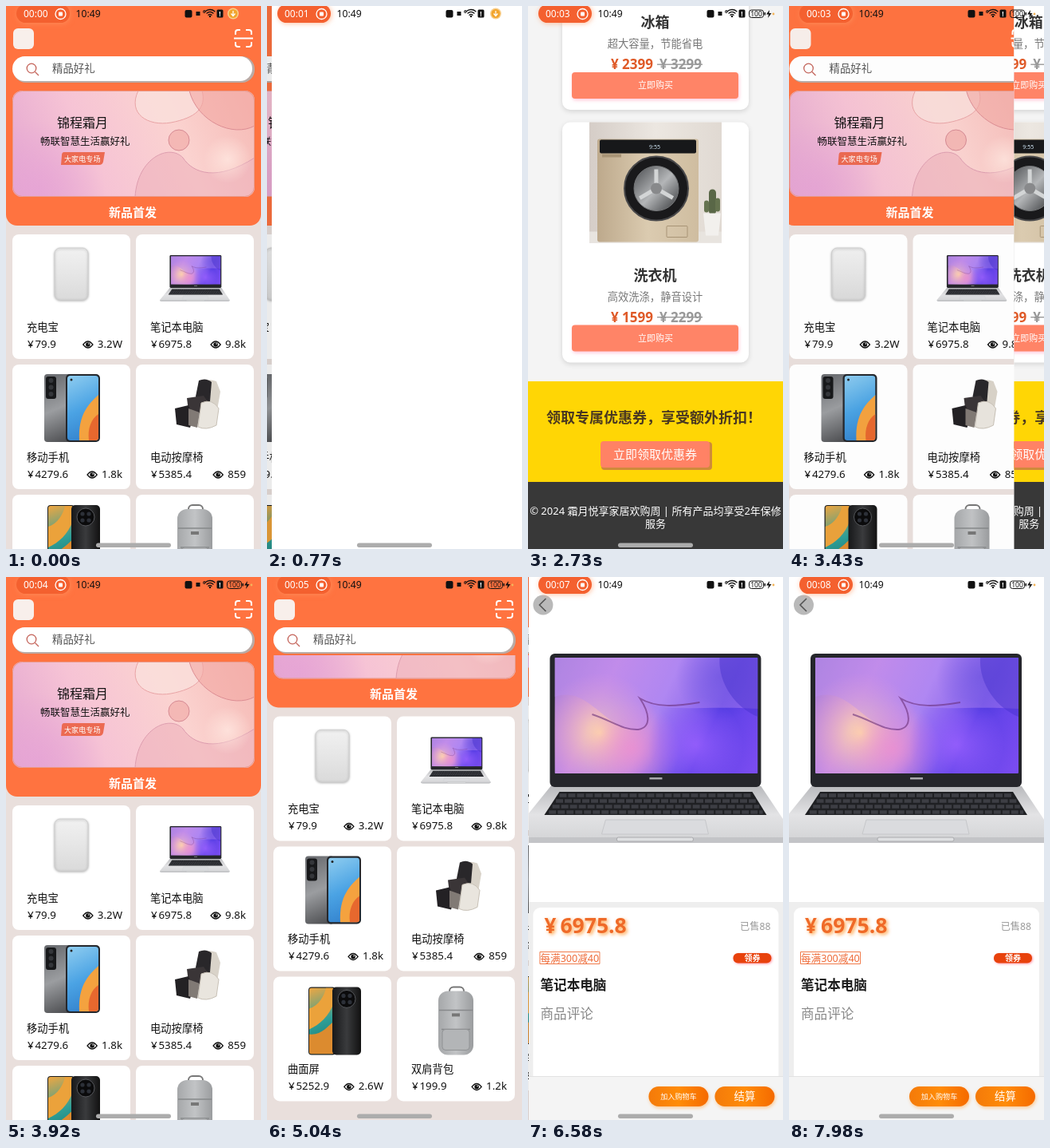
An HTML page with a canvas that plays this animation: 320 px wide and 680 px high, repeating every 8 s.

```html
<!DOCTYPE html>
<html lang="zh-CN">
<head>
<meta charset="utf-8">
<style>
html, body { margin: 0; width: 320px; height: 680px; overflow: hidden; background: #fff; }
canvas { display: block; }
</style>
</head>
<body>
<canvas id="stage" width="320" height="680"></canvas>
<script>
const g = document.getElementById('stage').getContext('2d');
const FONT = '"Noto Sans","Noto Sans CJK SC","Noto Sans CJK",sans-serif';
const clamp = v => Math.max(0, Math.min(1, v));

// ---------- drawing helpers ----------
function box(x, y, w, h, r, fill, stroke, lw = 1) {
  g.beginPath();
  g.roundRect(x, y, w, h, r);
  paint(fill, stroke, lw);
}
function paint(fill, stroke, lw = 1) {
  if (fill) { g.fillStyle = fill; g.fill(); }
  if (stroke) { g.strokeStyle = stroke; g.lineWidth = lw; g.stroke(); }
}
function disc(x, y, r, fill, stroke, lw) {
  g.beginPath();
  g.arc(x, y, r, 0, 7);
  paint(fill, stroke, lw);
}
function shape(d, fill, stroke, lw) {
  const p = new Path2D(d);
  if (fill) { g.fillStyle = fill; g.fill(p); }
  if (stroke) { g.strokeStyle = stroke; g.lineWidth = lw || 1; g.stroke(p); }
}
function text(s, x, y, size, color, weight = 400, align = 'left') {
  g.font = `${weight} ${size}px ${FONT}`;
  g.textAlign = align;
  g.fillStyle = color;
  g.fillText(s, x, y);
}
function fade(x0, y0, x1, y1, ...colors) {
  const f = g.createLinearGradient(x0, y0, x1, y1);
  colors.forEach((c, i) => f.addColorStop(i / (colors.length - 1), c));
  return f;
}
function glow(x, y, r, inner, outer) {
  const f = g.createRadialGradient(x, y, 0, x, y, r);
  f.addColorStop(0, inner);
  f.addColorStop(1, outer);
  disc(x, y, r, f);
}
function group(fn) { g.save(); fn(); g.restore(); }
function at(x, y, fn) { group(() => { g.translate(x, y); fn(); }); }
function clipBox(x, y, w, h, r) {
  g.beginPath();
  g.roundRect(x, y, w, h, r);
  g.clip();
}
function shadow(color, blur, dx = 0, dy = 0) {
  g.shadowColor = color;
  g.shadowBlur = blur;
  g.shadowOffsetX = dx;
  g.shadowOffsetY = dy;
}

// ---------- products ----------
function laptop() {
  shape('M28 262H292L335 326Q335 332 325 333H-14Q-24 332 -24 326Z', fade(0, 262, 0, 333, '#b9babd', '#e3e3e5', '#d2d3d5'));
  shape('M-24 326H335Q335 332 325 333H-14Q-24 332 -24 326Z', '#c3c4c7');
  box(111, 326, 96, 5, 2, '#dfe0e2', '#a9aaad');
  shape('M39 269H281L299 298H20Z', '#1f2023');
  g.setLineDash([9, 2]);
  for (let i = 0; i < 4; i++) {
    const y = 273.5 + i * 7, in_ = 39 - i * 4.4;
    shape(`M${in_} ${y}H${320 - in_}`, null, '#3d3e44', 4.5);
  }
  g.setLineDash([]);
  shape('M97 304H222L226 322H92Z', '#dadbde', '#c6c7ca');
  box(27, 96, 265, 167, 6, '#25262b');
  group(() => {
    clipBox(33, 101, 255, 145, 1);
    g.fillStyle = fade(33, 110, 288, 230, '#a87fd8', '#c58be6', '#a983f2', '#5a3fe6', '#7a4cf0');
    g.fillRect(33, 101, 255, 145);
    glow(90, 195, 75, '#ffdca8', '#f7a6c800');
    glow(130, 215, 60, '#ee8fd0cc', '#ee8fd000');
    glow(240, 125, 55, '#3c30d4aa', '#3c30d400');
    glow(210, 210, 60, '#9d62ffcc', '#9d62ff00');
    shape('M33 150C75 135 95 190 135 192C155 190 150 170 138 152C170 172 215 160 288 165V101H33Z', '#b88cf066');
    shape('M80 172C105 180 118 192 138 191C155 188 152 170 140 152C160 164 185 162 215 157', null, '#6a2f7a99', 2);
    shape('M240 101C238 135 262 165 288 175V101Z', '#4630cc77');
  });
  box(152, 251, 16, 2.5, 0, '#a9a9ad');
}
function powerBank() {
  shadow('#0004', 3, 0, 1);
  box(61, 17, 42, 65, 7, fade(0, 17, 0, 82, '#f1f1f1', '#e6e6e6', '#dadada'), '#d0d0d0');
}
function smallLaptop() {
  g.translate(75 - 160 * .245, 26 - 96 * .245);
  g.scale(.245, .245);
  laptop();
}
function phones() {
  box(48, 12, 36, 85, 4, fade(48, 12, 84, 97, '#66686c', '#9b9da0', '#48494c'));
  box(50, 15, 13, 28, 3, '#17181a');
  for (let i = 0; i < 3; i++) disc(56.5, 20 + i * 8.5, 3, '#34363a');
  box(75, 12, 43, 85, 5, '#24272c');
  group(() => {
    clipBox(77, 14, 39, 81, 4);
    g.fillStyle = fade(77, 14, 116, 95, '#8fcdf0', '#4ba3e4', '#2e7cc9');
    g.fillRect(77, 14, 39, 81);
    shape('M116 38C105 48 90 62 92 95H116Z', '#f4a23f');
    shape('M116 62C107 68 102 80 104 95H116Z', '#e7682e');
  });
  disc(82, 19, 1.5, '#222');
}
function chair() {
  shape('M84 22Q90 17 101 21L106 34 102 57 90 62 84 48Z', '#d9d3c9');
  shape('M79 20Q88 16 95 22L93 46 82 52 75 40Z', '#29272a');
  shape('M64 42L85 39 94 52 85 62 66 58Z', '#3a3537');
  shape('M82 48Q96 42 104 55L101 76Q88 83 78 78Z', '#e9e5de', '#c8c1b6');
  shape('M49 55L66 51 72 66 68 79 51 75Z', '#232124');
  shape('M66 55L80 60 77 79 66 76Z', '#817a75');
}
function darkPhones() {
  box(52, 13, 34, 85, 4, '#1b1d1f');
  group(() => {
    clipBox(53, 14, 31, 83, 3);
    g.fillStyle = fade(53, 14, 84, 97, '#f0a742', '#2f9f97', '#126b69');
    g.fillRect(53, 14, 31, 83);
    shape('M53 40C65 36 72 24 74 14H84V32C78 50 66 60 53 66Z', '#eba23b');
    shape('M53 72C68 74 76 62 84 56V97H53Z', '#dc8b2f');
  });
  box(82, 13, 36, 85, 5, fade(82, 0, 118, 0, '#17181a', '#3a3b3d', '#111'));
  disc(100, 28, 11, '#0b0b0c', '#55575b');
  [[96, 24], [104, 24], [96, 32], [104, 32]].forEach(([x, y]) => disc(x, y, 2.6, '#2c3038'));
}
function backpack() {
  box(66, 13, 18, 12, 5, null, '#777', 2);
  box(52, 18, 44, 80, 12, fade(52, 0, 96, 0, '#a5a7a9', '#c2c4c6', '#9b9d9f'));
  shape('M53 42H95M56 66H92', null, '#87898b', 1.5);
  box(57, 66, 34, 26, 4, '#b3b5b7', '#8f9193');
  box(69, 46, 10, 4, 0, '#777');
}
const goods = [
  ['充电宝', '79.9', '3.2W', powerBank],
  ['笔记本电脑', '6975.8', '9.8k', smallLaptop],
  ['移动手机', '4279.6', '1.8k', phones],
  ['电动按摩椅', '5385.4', '859', chair],
  ['曲面屏', '5252.9', '2.6W', darkPhones],
  ['双肩背包', '199.9', '1.2k', backpack]
];

// ---------- home ----------
function eye(x, y) {
  shape(`M${x - 6} ${y}Q${x} ${y - 8} ${x + 6} ${y}Q${x} ${y + 8} ${x - 6} ${y}Z`, '#fff', '#111', 1.4);
  disc(x, y, 2.8, '#111');
  disc(x + 1, y - 1, .8, '#fff');
}
function banner() {
  group(() => {
    clipBox(8, 106, 304, 133, 12);
    g.fillStyle = fade(8, 239, 312, 106, '#e3a5d0', '#f6c3d5', '#fbd3d0', '#f5b9b4');
    g.fillRect(8, 106, 304, 133);
    glow(40, 230, 85, '#e6a3d6cc', '#e6a3d600');
    shape('M166 106C152 135 178 151 207 146C238 140 252 128 246 106Z', '#fbe0dccc', '#e8a3a5');
    shape('M230 106C240 145 285 165 312 150V106Z', '#f3a9a499', '#dc8d93');
    shape('M162 239C165 190 205 172 222 190C235 210 265 220 312 190V239Z', '#efb2bd99', '#dc9cae');
    disc(217, 168, 13, '#f0a7a499', '#d68b94');
    glow(278, 192, 30, '#ffe7e0cc', '#ffe7e000');
  });
  box(8.5, 106.5, 303, 132, 12, null, '#e99a8c');
  text('锦程霜月', 64, 152, 16, '#111');
  text('畅联智慧生活赢好礼', 43, 174, 12.5, '#111', 500);
  shape('M73 183H124L122 195Q121 199 117 199H69L70 187Q70 183 73 183Z', '#ec6a52');
  text('大家电专场', 73, 194.5, 9.1, '#fff');
  text('新品首发', 159, 264, 15, '#fff', 700, 'center');
}
function goodsCard([name, price, views, draw], i) {
  at(i % 2 ? 163 : 8, 286 + 163 * (i >> 1), () => {
    box(0, 0, 148, 156, 8, '#fff');
    at(i % 2 ? 0 : -8, 0, () => draw());
    text(name, 18, 121, 13.3, '#111');
    text('¥', 19, 142, 13.3, '#111');
    text(price, 28.5, 142, 13.3, '#111');
    text(views, 138, 142, 13.3, '#111', 400, 'right');
    eye(138 - g.measureText(views).width - 12, 138);
  });
}
function home(scroll) {
  g.fillStyle = '#e9dfdc';
  g.fillRect(0, 0, 320, 680);
  at(0, -scroll, () => {
    box(0, 0, 320, 275, [0, 0, 14, 14], '#ff7340');
    banner();
    goods.forEach(goodsCard);
  });
  g.fillStyle = '#ff7340';
  g.fillRect(0, 0, 320, 98);
  box(9, 28, 26, 26, 6, '#f8efeb');
  shape('M288 36V33Q288 30 291 30H294M301 30H305Q308 30 308 33V36M308 45V48Q308 51 305 51H301M294 51H291Q288 51 288 48V45M286 40.5H310', null, '#fff', 2);
  box(9, 63, 303, 33, 16, '#b9aba6');
  box(8, 63, 301, 31, 16, '#fff');
  disc(32, 78, 5.8, null, '#c4645a', 1.3);
  shape('M36.5 82.5L41 87', null, '#c4645a', 1.3);
  text('精品好礼', 58, 83, 13.4, '#555');
}

// ---------- sale page ----------
function airConditioner() {
  box(77, 0, 166, 151, 0, '#eef0f2');
  box(88, 45, 144, 48, 8, '#fff', '#ccc');
  box(98, 80, 124, 6, 2, '#b5b9bd');
}
function fridge() {
  shape('M120 9L135 7 202 9V152L166 156 121 151Z', fade(120, 10, 202, 150, '#68696b', '#b5b5b5', '#737476', '#bdbdbd', '#6b6c6e'));
  shape('M120 9L135 7V154L121 151Z', '#777471');
  shape('M168 8V156M135 94H202', null, '#3c3c3e', 1.6);
  shape('M165 14V90M171 14V90', null, '#d0d0d0', 1);
  box(178, 28, 19, 54, 1, '#24272b');
  box(180, 35, 15, 38, 0, fade(0, 35, 0, 73, '#8ab8dc', '#e6eef2', '#5e93bd'));
}
function washer() {
  box(77, 0, 166, 151, 0, fade(77, 0, 243, 0, '#d5cdc7', '#ece7e1', '#e0d9d2'));
  box(77, 137, 166, 14, 0, '#e8e4df');
  box(87, 21, 127, 129, 3, fade(87, 0, 214, 0, '#bda98c', '#dbcbb0', '#cfbda0'));
  box(90, 22, 121, 17, 2, '#17181a');
  text('9:55', 159, 33, 7, '#cfe4f4', 400, 'center');
  box(93, 40, 24, 4, 0, '#a89476');
  disc(161, 83, 40, '#19191b', '#48484a', 2);
  disc(161, 83, 28, fade(135, 60, 187, 110, '#55575a', '#b4b6b8', '#3b3d40'), '#76787a');
  for (let i = 0; i < 3; i++) {
    const a = i * 2.094 + .52;
    shape(`M161 83L${161 + 24 * Math.cos(a)} ${83 + 24 * Math.sin(a)}`, null, '#d3d5d6', 5);
  }
  disc(161, 83, 7, '#88898b');
  box(174, 130, 26, 14, 1, null, '#a89476');
  box(227, 84, 9, 32, 4.5, '#596747');
  box(221, 98, 6, 15, 3, '#65734f');
  box(235, 95, 6, 17, 3, '#65734f');
  shape('M220 114H242L239 142H223Z', '#f2f0ed');
}
const deals = [
  ['空调', '快速制冷，智能温控', 1999, 2999, airConditioner],
  ['冰箱', '超大容量，节能省电', 2399, 3299, fridge],
  ['洗衣机', '高效洗涤，静音设计', 1599, 2299, washer]
];
function deal([name, note, now, old, draw], i) {
  at(0, 226.5 + 316.5 * i, () => {
    group(() => { shadow('#0002', 6, 0, 2); box(43, 0, 234, 301, 10, '#fff'); });
    draw();
    text(name, 159.5, 198, 18, '#333', 700, 'center');
    text(note, 159.5, 223, 13.3, '#777', 400, 'center');
    text('¥', 104, 250, 17, '#df5a28', 700);
    text(now, 118, 250, 17, '#df5a28', 700);
    text('¥', 165, 250, 17, '#999', 700);
    text(old, 179, 250, 17, '#999', 700);
    g.fillRect(162, 243.5, 57, 1.4);
    group(() => { shadow('#f9b8', 4, 1, 2); box(55, 254, 209, 33, 4, '#ff8467'); });
    text('立即购买', 160, 274, 11, '#fff', 400, 'center');
  });
}
const SALE_END = 714;
function sale(t) {
  const u = clamp((t - 1352) / 800);
  const scroll = SALE_END * u * u * (3 - 2 * u);
  g.fillStyle = '#fff';
  g.fillRect(0, 0, 320, 680);
  if (t < 1000) return;
  g.fillStyle = '#f4f4f4';
  g.fillRect(0, 0, 320, 680);
  at(0, -scroll, () => {
    box(0, 0, 320, 206, 0, '#ff8262');
    text('霜月悦享家居欢购周', 160, 118, 25, '#fff', 700, 'center');
    deals.forEach(deal);
    at(0, SALE_END, () => {
      box(0, 470, 320, 126, 0, '#ffd605');
      text('领取专属优惠券，享受额外折扣！', 158, 522, 18, '#4a3820', 700, 'center');
      box(92, 546, 139, 35, 4, '#cf8a3a');
      box(91, 545, 137, 33, 4, '#ff8265');
      text('立即领取优惠券', 159.5, 567, 15, '#fff', 400, 'center');
      box(0, 596, 320, 84, 0, '#383838');
      text('© 2024 霜月悦享家居欢购周 | 所有产品均享受2年保修', 160, 637, 13, '#fff', 400, 'center');
      text('服务', 160, 653, 13, '#fff', 400, 'center');
    });
  });
  g.globalAlpha = clamp((t - 1340) / 60) * clamp((2500 - t) / 200);
  box(315, scroll * .495, 3, 337, 1.5, '#909090');
  g.globalAlpha = 1;
}

// ---------- product page ----------
function pill(x, w, label, size, weight) {
  group(() => {
    shadow('#ffad5599', 4, 1, 2);
    box(x, 638, w, 25, 12.5, fade(x, 0, x + w, 0, '#f47a0a', '#ff8c08', '#f56a00'));
  });
  text(label, x + w / 2, 650.5 + size * .36, size, '#fff', weight, 'center');
}
function detail() {
  g.fillStyle = '#fff';
  g.fillRect(0, 0, 320, 680);
  laptop();
  disc(18.5, 35, 12.5, '#b9b9b9');
  shape('M22 27L14 35 22 43', null, '#555', 1.6);
  g.fillStyle = '#eeeeee';
  g.fillRect(0, 407, 320, 273);
  box(6, 414, 308, 230, 9, '#fff');
  group(() => {
    shadow('#ffa64d', 4, 2, 2);
    text('¥', 20, 446, 26, '#ef6a28', 800);
    text('6975.8', 40, 446, 26.5, '#ef6a28', 800);
  });
  text('已售88', 304, 442, 12.2, '#999', 400, 'right');
  box(14.5, 469.5, 75, 15, 0, null, '#f07a4a');
  text('每满300减40', 15, 481.5, 12.6, '#ee6a38');
  group(() => { shadow('#f9a', 3, 1, 1); box(257, 471, 48, 12.5, 6, '#e8420c'); });
  text('领券', 281, 481, 10, '#fff', 700, 'center');
  text('笔记本电脑', 15, 516.5, 16.6, '#1c1c1c', 700);
  text('商品评论', 15, 552.5, 16.6, '#888');
  box(0, 625, 320, 55, 0, '#f4f4f4');
  g.fillStyle = '#e2e2e2';
  g.fillRect(0, 625, 320, 1);
  pill(151, 75, '加入购物车', 9.1, 400);
  pill(234, 75, '结算', 13.4, 500);
}

// ---------- system bar ----------
function statusBar(t) {
  group(() => { shadow('#ff9a6699', 6, 1, 1); box(13, -2, 67, 23, 11.5, '#f4602f'); });
  text('00:0' + Math.floor((t + 470) / 1000), 22, 14, 12, '#fff');
  disc(68.5, 10, 6.5, null, '#fff', 1.3);
  box(66, 7.5, 5, 5, 1, '#fff');
  text('10:49', 87.5, 14, 12.2, '#111', 500);
  box(224.5, 5, 9, 9.5, 2, '#111');
  box(238.5, 7, 5, 5, 0, '#111');
  g.lineCap = 'round';
  for (let r = 3; r < 10; r += 3) {
    g.beginPath();
    g.arc(256, 13.5, r, -2.3, -.85);
    paint(null, '#111', 1.4);
  }
  g.lineCap = 'butt';
  disc(256, 13, 1.2, '#111');
  text('6', 247, 9, 6, '#111', 700);
  box(264.5, 4.5, 8, 10, 1.5, '#111');
  text('!', 268.5, 12.5, 8, '#fff', 700, 'center');
  if (t < 1200) {
    const x = 285 + 2 * clamp(t / 700);
    disc(x, 9.5, 7, '#f8cf8d');
    disc(x, 9.5, 5.5, '#f2a52d');
    shape(`M${x} 6V12M${x - 2.5} 9.5L${x} 12.5 ${x + 2.5} 9.5`, null, '#fff', 1.2);
  } else {
    box(277.5, 5, 18, 9.5, 3, null, '#111');
    text('100', 286.5, 13, 8.6, '#111', 500, 'center');
    box(296.5, 8, 1.5, 3.5, 0, '#111');
    shape('M303 5L299 10.5H302L301 15 305.5 9H302.5Z', '#111');
    disc(308, 10, 1.4, '#f3b45a');
  }
  box(113, 672.5, 94, 5.5, 2.7, '#acacac');
}

// ---------- timeline ----------
function spring(ms) {
  const x = Math.max(0, ms) * .0092;
  return 1 - (1 + x) * Math.exp(-x);
}
function cover(t) {
  if (t < 3030) return spring(t - 130);
  if (t < 5700) return 1 - spring(t - 3030);
  return spring(t - 5700);
}
function frame(now) {
  const t = now % 8000;
  const p = cover(t);
  const edge = 320 * (1 - p) < .8 ? 0 : 320 * (1 - p);
  const shift = p < .004 ? 0 : -64 * p;
  const scroll = 125 * (1 - (1 - clamp((t - 4700) / 650)) ** 3);
  at(shift, 0, () => home(scroll));
  g.fillStyle = `rgba(0,0,0,${.08 * p})`;
  g.fillRect(0, 0, 320, 680);
  if (p > .003) group(() => {
    clipBox(edge, 0, 320, 680, 0);
    g.translate(edge / 2, 0);
    t < 5000 ? sale(t) : detail();
  });
  statusBar(t);
  requestAnimationFrame(frame);
}
requestAnimationFrame(frame);
</script>
</body>
</html>
```
